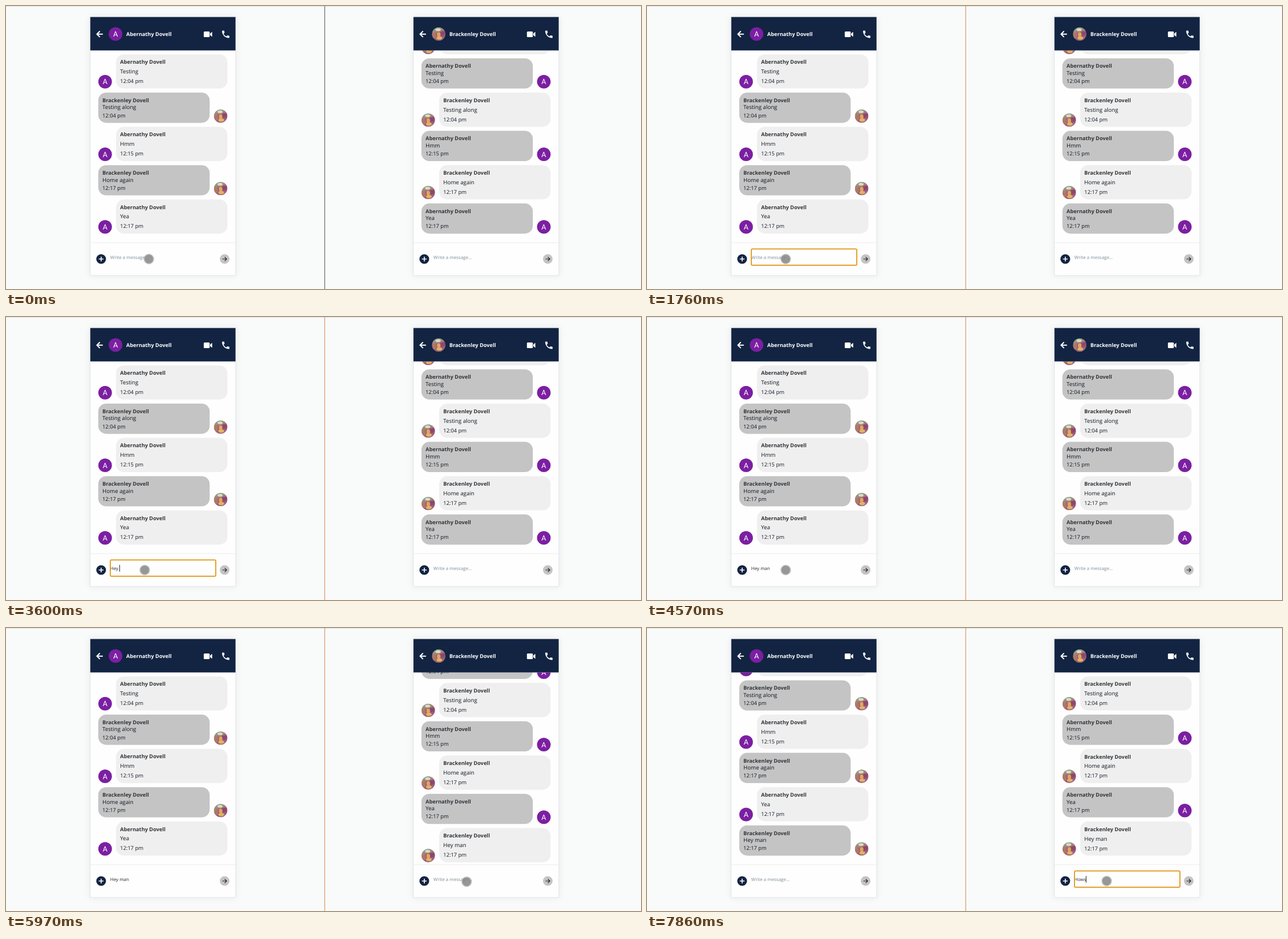
An HTML page that plays this animation: 1120 px wide and 500 px high, repeating every 8000 ms.

```html
<!DOCTYPE html>
<html lang="en">
<head>
<meta charset="utf-8">
<title>Two-way chat</title>
<style>
  html, body { margin: 0; width: 100%; height: 100%; overflow: hidden; background: #f9fafa; }
  svg { display: block; }
  text { font-family: "Open Sans", "Noto Sans", sans-serif; font-size: 9.75px; fill: #0f1620;
         text-rendering: geometricPrecision; white-space: pre; }
  .name { font-size: 9.25px; font-weight: 700; fill: #33353a; }
  .time { font-size: 9.4px; }
  .title { font-size: 9.25px; font-weight: 700; fill: #fff; }
  .initial { font: 13px Roboto, sans-serif; fill: #fff; text-anchor: middle; }
  .field { font-size: 8px; fill: #23272e; }
  .field.empty { fill: #7b8b96; }
  .screen { fill: #fefefe; stroke: #e2e4e6; filter: drop-shadow(0 0 6px rgba(0, 0, 0, .07)); }
  .focus { fill: none; stroke: #e3a02f; stroke-width: 2; }
  .line { fill: none; stroke: #fff; stroke-width: 2; stroke-linecap: round; stroke-linejoin: round; }
</style>
</head>
<body>
<svg id="stage" width="1120" height="500" viewBox="0 0 1120 500">
  <defs>
    <linearGradient id="scene" x1=".3" y1="0" x2=".6" y2="1">
      <stop offset=".1" stop-color="#8fa48c"/>
      <stop offset=".35" stop-color="#a87a72"/>
      <stop offset=".5" stop-color="#8f4a70"/>
      <stop offset="1" stop-color="#a8707a"/>
    </linearGradient>
    <clipPath id="chatArea"><path d="M148 78.6h257v338.9h-257z"/></clipPath>
    <clipPath id="disc"><circle r="12"/></clipPath>
    <g id="photo" clip-path="url(#disc)">
      <circle r="12" fill="url(#scene)"/>
      <ellipse cx="-1" cy="-7.5" rx="4.5" ry="2.5" fill="#e9e6cf" opacity=".85"/>
      <ellipse cx="6.5" cy="-1" rx="4.5" ry="4" fill="#8a4377" opacity=".7"/>
      <ellipse cx="-8" cy="3" rx="4" ry="5" fill="#b5806a" opacity=".8"/>
      <ellipse cx="0" cy="1" rx="3.2" ry="4" fill="#dfa65e"/>
      <ellipse cx="1" cy="7" rx="5" ry="2.8" fill="#e2b266"/>
    </g>
    <g id="letter">
      <circle r="12" fill="#7b1fa2"/>
      <text class="initial" y="4.6">A</text>
    </g>
  </defs>
  <path d="M0 .5h1120" stroke="#dcdddd"/>
  <path id="divider" d="M562.2 0v500" stroke-width="1.4"/>
  <g id="phones"></g>
  <g id="pointer">
    <circle r="9.3" fill="#a4a6a4" opacity=".6"/>
    <circle r="7.7" fill="#747674" opacity=".6"/>
  </g>
  <path id="mover" stroke="#fff" stroke-width="1.2" paint-order="stroke"
    d="M0-7l3 3.2H.9V-.9h2.9V-3L7 0 3.8 3V.9H.9v2.9H3L0 7l-3-3.2h2.1V.9h-2.9V3L-7 0l3.2-3v2.1h2.9v-2.9H-3z"/>
</svg>
<script>
const LOOP = 8000, GAP = 7.2, LIST_BOTTOM = 402.2;
const people = {
  a: { name: "Abernathy Dovell", avatar: "letter" },
  b: { name: "Brackenley Dovell", avatar: "photo" }
};
const messages = [
  ["b", "Testing", "12:04 pm"],
  ["a", "Testing", "12:04 pm"],
  ["b", "Testing along", "12:04 pm"],
  ["a", "Hmm", "12:15 pm"],
  ["b", "Home again", "12:17 pm"],
  ["a", "Yea", "12:17 pm"],
  ["b", "Hey man", "12:17 pm"]
];
const received = { x: 194, height: 60.4, fill: "#efefef", avatarX: 174.8, lines: [16.9, 33.7, 50.7] };
const sent = { x: 162.7, height: 53.4, fill: "#c4c4c4", avatarX: 378.6, lines: [16.9, 29.4, 43.6] };

const avatar = (person, x, y) =>
  `<g transform="translate(${x} ${y})"><use href="#${people[person].avatar}"/></g>`;

function bubble([from, body, time], style, top) {
  const line = (i, content, kind) =>
    `<text class="${kind}" x="${style.x + 7.3}" y="${top + style.lines[i]}">${content}</text>`;
  return `<g class="message">
    <rect x="${style.x}" y="${top}" width="196.5" height="${style.height}" rx="14" fill="${style.fill}"/>
    ${line(0, people[from].name, "name")}${line(1, body, "body")}${line(2, time, "time")}
    ${avatar(from, style.avatarX, top + style.height - 12)}</g>`;
}

function thread(peer) {
  let bottom = LIST_BOTTOM, out = "";
  for (const message of [...messages].reverse()) {
    const style = message[0] === peer ? received : sent;
    out = bubble(message, style, bottom - style.height) + out;
    bottom -= style.height + GAP;
  }
  return out;
}

function phone(id, peer, x) {
  return `<g id="${id}" transform="translate(${x})">
    <rect class="screen" x="148.5" y="19.5" width="256.5" height="456.5"/>
    <g clip-path="url(#chatArea)"><g class="thread">${thread(peer)}</g></g>
    <path d="M148.7 19.6h256.1v59h-256.1z" fill="#122442"/>
    <path class="line" d="M170 49.7h-9.5M165 45l-4.7 4.7 4.7 4.7"/>
    ${avatar(peer, 193.2, 49.5)}
    <text class="title" x="212" y="53.4">${people[peer].name}</text>
    <rect x="348.8" y="45" width="10.4" height="10" rx="1.6" fill="#fff"/>
    <path d="M360 48.4l3.6-2.6v8.4l-3.6-2.6z" fill="#fff"/>
    <path transform="translate(378.9 41.3) scale(.72)" fill="#fff" d="M6.62 10.79c1.44 2.83 3.76 5.14 6.59
      6.59l2.2-2.2c.27-.27.67-.36 1.02-.24 1.12.37 2.33.57 3.57.57.55 0 1 .45 1 1V20c0 .55-.45 1-1
      1-9.39 0-17-7.61-17-17 0-.55.45-1 1-1h3.5c.55 0 1 .45 1 1 0 1.25.2 2.45.57 3.57.11.35.03.74-.25 1.02z"/>
    <path d="M149 418h256" stroke="#ececee"/>
    <circle cx="167.8" cy="447" r="8.6" fill="#122442"/>
    <path class="line" style="stroke-width:1.7" d="M164.3 447h7M167.8 443.5v7"/>
    <circle cx="385.6" cy="447" r="8.5" fill="#c4c4c4"/>
    <path class="line" style="stroke:#222;stroke-width:1.2" d="M382 447h7M386 443.8l3.2 3.2-3.2 3.2"/>
    <text class="field" x="183.8" y="447"></text>
    <rect class="caret" y="438" width="1" height="12" fill="#222"/>
    <rect class="focus" x="184" y="429.2" width="186" height="28.8" rx="2"/>
  </g>`;
}

const $ = selector => document.querySelector(selector);
const show = (element, on) => element.setAttribute("visibility", on ? "visible" : "hidden");

$("#phones").innerHTML = phone("left", "a", 0) + phone("right", "b", 570);

// Each step changes only the listed values and holds the rest.
const steps = [
  [0, { at: [252, 447], moving: false, divider: "#77797b", focus: "", caret: false,
        left: "", right: "", leftNew: false, rightNew: false, rightLag: 0 }],
  [220, { at: [244.7, 447] }],
  [1760, { focus: "left", divider: "#dfa07a" }],
  [2230, { caret: true }],
  [2690, { left: "H" }],
  [3140, { left: "Hey" }],
  [3600, { left: "Hey " }],
  [4080, { left: "Hey man" }],
  [4570, { focus: "", caret: false }],
  [5040, { at: [823.5, 442.7] }],
  [5530, { at: [830.3, 439] }],
  [5970, { at: [812.5, 448.2], rightNew: true, rightLag: 11.7 }],
  [6450, { at: [810.8, 447], moving: true, focus: "right", left: "", leftNew: true, rightLag: 0 }],
  [6920, { caret: true }],
  [7400, { right: "H", moving: false }],
  [7860, { right: "Hows" }]
];

function drawPhone(id, state, lastHeight, lag) {
  const part = selector => $(`#${id} ${selector}`);
  const value = state[id], focused = state.focus === id, arrived = state[id + "New"];
  const field = part(".field");
  field.textContent = value || "Write a message...";
  field.classList.toggle("empty", !value);
  const caretX = 184 + (value ? Math.round(field.getComputedTextLength() - .2) : 0);
  part(".caret").setAttribute("x", caretX);
  show(part(".caret"), focused && state.caret);
  show(part(".focus"), focused);
  show(part(".message:last-child"), arrived);
  part(".thread").setAttribute("transform", `translate(0 ${arrived ? lag : lastHeight + GAP})`);
}

function draw(time) {
  const state = Object.assign({}, ...steps.filter(([start]) => start <= time).map(step => step[1]));
  drawPhone("left", state, sent.height, 0);
  drawPhone("right", state, received.height, state.rightLag);
  $("#divider").setAttribute("stroke", state.divider);
  for (const id of ["pointer", "mover"]) {
    $("#" + id).setAttribute("transform", `translate(${state.at})`);
    show($("#" + id), state.moving === (id === "mover"));
  }
}

const start = performance.now();
function tick() {
  draw((performance.now() - start) % LOOP);
  requestAnimationFrame(tick);
}
tick();
</script>
</body>
</html>
```
